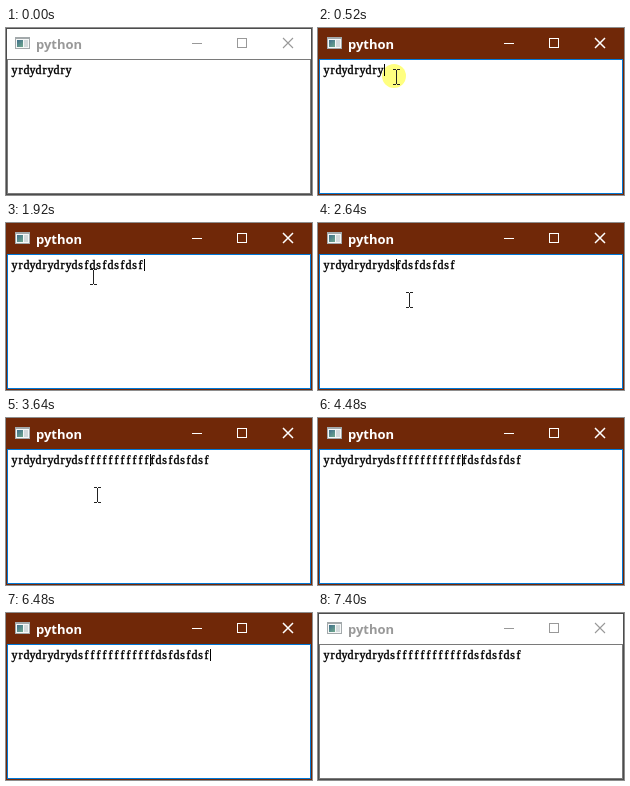
An HTML page with a canvas for the animation above (7.48 s loop, 306 by 167 pixels).

```html
<!DOCTYPE html>
<html lang="en">
<head>
<meta charset="utf-8">
<title>Text input</title>
<style>
  html, body { margin: 0; width: 100%; height: 100%; overflow: hidden; background: #fff; }
  canvas { display: block; }
</style>
</head>
<body>
<canvas id="stage" width="306" height="167"></canvas>
<script>
const canvas = document.getElementById('stage');
const ctx = canvas.getContext('2d');
const { width: W, height: H } = canvas;

const LOOP = 7480;
const TICK = 80;
const CLICK_TIME = 160;
const BLUR_AT = 7400;
const TITLE_H = 31;
const CELL = 6;
const TEXT_X = 6;
const FIRST_LINE = 'yrdydrydry';
const TYPED = 'dsf'.repeat(4);
const INSERT_AT = 12;
const INSERTED = 11;

// The pointer rests at each stop and glides to the next; it is hidden between visits.
const visits = [
  [
    { from: 80, to: 80, x: 112, y: 140 },
    { from: 400, to: 1120, x: 75, y: 41, click: 440 },
    { from: 1840, to: 1920, x: 84, y: 46 },
    { from: 2160, to: 2440, x: 78, y: 38, click: 2200 },
    { from: 2640, to: 4160, x: 88, y: 69 },
    { from: 4480, to: 4480, x: 112, y: 180 }
  ],
  [
    { from: 5200, to: 5200, x: 208, y: 109 },
    { from: 5360, to: 5520, x: 221, y: 72, click: 5400 },
    { from: 5760, to: 6480, x: 163, y: 147 }
  ]
];
const clicks = visits.flat().filter(s => s.click).map(s => s.click);
const [focusAt, caretAt, caretEndAt] = clicks;

const within = (t, start, end) => t >= start && t < end;
const progress = (t, start, end) => Math.min(1, Math.max(0, (t - start) / (end - start)));
const smooth = k => k * k * (3 - 2 * k);
const mix = (a, b, k) => Math.round(a + (b - a) * k);

function pointerAt(t) {
  const stops = visits.find(v => within(t, v[0].from, v[v.length - 1].to));
  if (!stops) return null;
  const i = stops.findLastIndex(s => s.from <= t);
  const here = stops[i];
  const next = stops[i + 1] || here;
  const k = t > here.to ? smooth(progress(t, here.to, next.from)) : 0;
  return { x: mix(here.x, next.x, k), y: mix(here.y, next.y, k) };
}

function textAt(t) {
  const typed = t < 1200 ? 0 : mix(1, TYPED.length, progress(t, 1200, 1920));
  const held = t < 2960 ? 0 : t < 3360 ? 1 : mix(3, INSERTED, progress(t, 3360, 3600));
  const line = FIRST_LINE + TYPED.slice(0, typed);
  const text = line.slice(0, INSERT_AT) + 'f'.repeat(held) + line.slice(INSERT_AT);
  const caret = within(t, caretAt, caretEndAt) ? INSERT_AT + held : text.length;
  return { text, caret };
}

function rect(color, x, y, w, h) {
  ctx.fillStyle = color;
  ctx.fillRect(x, y, w, h);
}

function drawIcon() {
  rect('#a3a9ab', 9, 9, 15, 12);
  rect('#f6f8f8', 10, 11, 13, 9);
  const pane = ctx.createLinearGradient(11, 12, 17, 19);
  pane.addColorStop(0, '#3f6f8c');
  pane.addColorStop(1, '#6fa88c');
  rect(pane, 11, 12, 6, 7);
  rect('#d3dadc', 18, 12, 4, 7);
}

function drawButtons(color, crossWidth) {
  rect(color, 186, 15, 10, 1);
  ctx.strokeStyle = color;
  ctx.lineWidth = 1;
  ctx.strokeRect(231.5, 10.5, 9, 9);
  ctx.lineWidth = crossWidth;
  ctx.beginPath();
  ctx.moveTo(277, 10);
  ctx.lineTo(287, 20);
  ctx.moveTo(287, 10);
  ctx.lineTo(277, 20);
  ctx.stroke();
}

function drawWindow(active) {
  const ink = active ? '#ffffff' : '#999999';
  rect(active ? '#702808' : '#4c4c4c', 0, 0, W, H);
  if (!active) rect('#ffffff', 1, 1, W - 2, TITLE_H - 1);
  rect(active ? '#0078d7' : '#7a7a7a', 1, TITLE_H, W - 2, H - TITLE_H - 1);
  rect('#ffffff', 2, TITLE_H + 1, W - 4, H - TITLE_H - 3);
  drawIcon();
  ctx.fillStyle = ink;
  ctx.font = 'bold 13px "Open Sans", sans-serif';
  ctx.textAlign = 'left';
  ctx.fillText('python', 30, 21);
  drawButtons(ink, active ? 1.5 : 1.1);
}

function drawText({ text, caret }, active) {
  ctx.fillStyle = ctx.strokeStyle = '#000';
  ctx.lineWidth = 0.4;
  ctx.font = '12px "Liberation Serif", serif';
  ctx.textAlign = 'center';
  [...text].forEach((c, i) => {
    const x = TEXT_X + (i + 0.5) * CELL - 0.5;
    ctx.fillText(c, x, 46);
    ctx.strokeText(c, x, 46);
  });
  if (active) rect('#000', TEXT_X + caret * CELL, 36, 1, 12);
}

function drawHalo({ x, y }) {
  ctx.fillStyle = '#ffff80';
  ctx.beginPath();
  ctx.arc(x + 1, y + 7, 12, 0, Math.PI * 2);
  ctx.fill();
}

function drawPointer({ x, y }) {
  for (const row of [y, y + 15]) {
    rect('#222', x, row, 3, 1);
    rect('#222', x + 4, row, 3, 1);
  }
  rect('#222', x + 3, y + 1, 1, 14);
}

function render(t) {
  const shown = Math.floor(t / TICK) * TICK;
  const active = within(t, focusAt, BLUR_AT);
  const clicking = clicks.some(c => within(t, c, c + CLICK_TIME));
  const pointer = pointerAt(shown);
  drawWindow(active);
  ctx.save();
  ctx.beginPath();
  ctx.rect(2, TITLE_H + 1, W - 4, H - TITLE_H - 3);
  ctx.clip();
  if (pointer && clicking) drawHalo(pointer);
  drawText(textAt(shown), active);
  if (pointer) drawPointer(pointer);
  ctx.restore();
}

const began = performance.now();
function tick() {
  render((performance.now() - began) % LOOP);
  requestAnimationFrame(tick);
}
tick();
</script>
</body>
</html>
```
